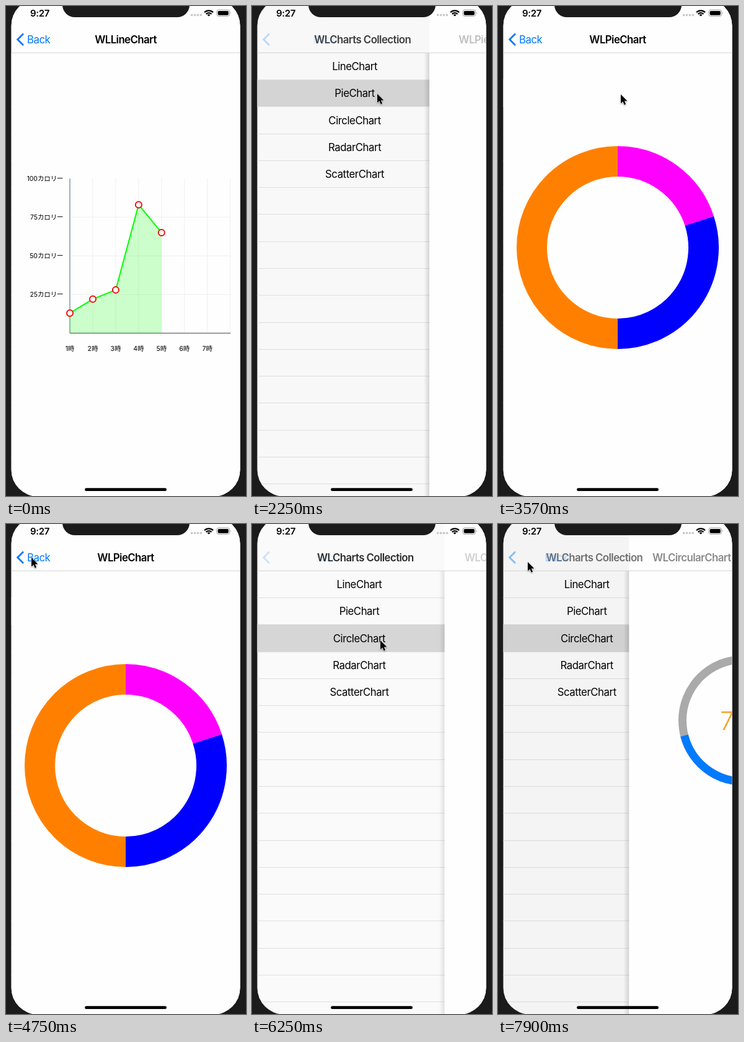
Write an HTML page that moves like this. It is 387 px wide and 787 px high and loops after 8000 ms.

```html
<!DOCTYPE html>
<html lang="en">
<head>
<meta charset="utf-8">
<title>WLCharts Collection</title>
<style>
  html, body { margin: 0; width: 100%; height: 100%; overflow: hidden; background: #1b1b1c; }
  svg { display: block; width: 387px; height: 787px; }
  text { font: 400 16.8px Inter, "Noto Sans CJK JP", "Noto Sans CJK", sans-serif; letter-spacing: -.46px; }
  .title { font-weight: 600; letter-spacing: -.56px; text-anchor: middle; }
  .mid { text-anchor: middle; }
  .time { font-size: 15px; font-weight: 600; letter-spacing: -.3px; }
  .label text { font-size: 10.5px; letter-spacing: -.1px; }
  .percent { font-size: 41px; font-weight: 300; letter-spacing: -.5px; fill: #f5a52f; text-anchor: middle; }
  .sep { stroke: #e3e3e3; }
  .grid { stroke: #efefef; }
  .ring { fill: none; stroke-width: 49; }
</style>
</head>
<body>
<svg viewBox="0 0 387 787">
  <defs>
    <clipPath id="screen"><rect x="8.5" y="-11.3" width="369" height="799" rx="43"/></clipPath>
    <linearGradient id="edge">
      <stop offset="0" stop-color="#000" stop-opacity="0"/>
      <stop offset="1" stop-color="#000" stop-opacity=".14"/>
    </linearGradient>
    <filter id="soft" x="-50%" y="-50%" width="220%" height="220%">
      <feDropShadow dx="0" dy="1" stdDeviation="1" flood-opacity=".4"/>
    </filter>
  </defs>
  <rect width="387" height="787" fill="#1b1b1c"/>
  <g clip-path="url(#screen)">
    <rect width="387" height="787" fill="#fefefe"/>
    <g id="list">
      <rect id="picked" x="8.5" y="75.5" width="369" height="43.2" fill="#d9d9d9"/>
      <g id="rows"></g>
    </g>
    <rect id="dim" x="8.5" width="369" height="787"/>
    <g id="detail">
      <rect id="shade" x="-.5" y="75" width="9" height="712" fill="url(#edge)"/>
      <rect x="8.5" width="370" height="787" fill="#fefefe"/>
      <g id="line" class="label"></g>
      <g id="pie"></g>
      <g id="circle" fill="none" stroke-width="13">
        <circle cx="192.5" cy="315.5" r="98" stroke="#aaa"/>
        <path id="arc" stroke="#007aff"/>
        <text id="percent" class="percent" x="193" y="331"></text>
      </g>
    </g>
    <path d="M8 75.2H378" stroke="#d3d3d3"/>
    <text id="home" class="title" y="59.5">WLCharts Collection</text>
    <text id="title" class="title" y="59.5"></text>
    <g id="back" fill="#007aff">
      <path d="M28 44.5 18.7 53.8 28 63.1" fill="none" stroke="#007aff" stroke-width="2.8"/>
      <text id="backText" x="34" y="59.5">Back</text>
    </g>
    <text class="time" x="39" y="16.5">9:27</text>
    <g id="dots" fill="#c6c6c8"></g>
    <g fill="none" stroke="#000" stroke-width="2.3">
      <path d="M320 10.2a10 10 0 0 1 14 0M322.6 13a6.2 6.2 0 0 1 8.8 0"/>
      <path d="M327 16.6 324.6 14.4a3.6 3.6 0 0 1 4.8 0z" fill="#000" stroke="none"/>
    </g>
    <rect x="339.9" y="6.2" width="20.6" height="10.2" rx="3" fill="none" stroke="#9b9b9b"/>
    <rect x="341.6" y="7.9" width="17.2" height="6.8" rx="1.6"/>
    <path d="M361.8 9.6q1.8 1.7 0 3.4z" fill="#9b9b9b"/>
    <rect x="127" y="774.2" width="132" height="4.9" rx="2.45"/>
  </g>
  <path d="M91 -2A20 20 0 0 0 111 18H276A20 20 0 0 0 296 -2z" fill="#1b1b1c"/>
  <path id="cursor" d="M0 0V14.6L3.4 11.5 5.7 16.8 8.1 15.8 5.9 10.6H10.5z" stroke="#fff" stroke-width="1" paint-order="stroke" filter="url(#soft)"/>
</svg>
<script>
const LOOP = 8000, STEP = 148.4, WIDTH = 369, ROW = 43.28, MID = 193;
const $ = id => document.getElementById(id);
const clamp = v => Math.max(0, Math.min(1, v));

function add(parent, tag, attrs, text) {
  const el = document.createElementNS('http://www.w3.org/2000/svg', tag);
  for (const k in attrs) el.setAttribute(k, attrs[k]);
  if (text) el.textContent = text;
  return parent.appendChild(el);
}
const set = (id, attrs) => { for (const k in attrs) $(id).setAttribute(k, attrs[k]); };

// Clockwise arc; from and to are turns counted from twelve o'clock
function arcPath(cx, cy, r, from, to) {
  if (to <= from) return '';
  const at = turn => {
    const a = turn * 2 * Math.PI;
    return `${cx + r * Math.sin(a)} ${cy - r * Math.cos(a)}`;
  };
  return `M${at(from)}A${r} ${r} 0 ${to - from > .5 ? 1 : 0} 1 ${at(to)}`;
}

// List
['LineChart', 'PieChart', 'CircleChart', 'RadarChart', 'ScatterChart'].forEach((name, i) =>
  add($('rows'), 'text', { class: 'mid', x: MID, y: 103 + i * ROW }, name));
for (let i = 1; i <= 16; i++)
  add($('rows'), 'path', { class: 'sep', d: `M23.5 ${Math.floor(75.3 + i * ROW) + .5}H378` });
for (let i = 0; i < 4; i++) add($('dots'), 'circle', { cx: 299.6 + i * 4.9, cy: 14.6, r: 1.8 });

// Line chart
const chart = $('line'), px = i => 103 + i * 36.95, py = v => 525.5 - v * 2.486;
for (let i = 1; i <= 7; i++) {
  add(chart, 'path', { class: 'grid', d: `M${px(i)} 277V525` });
  add(chart, 'text', { class: 'mid', x: px(i - 1), y: 553.5 }, i + '時');
}
for (const v of [25, 50, 75, 100]) {
  if (v < 100) add(chart, 'path', { class: 'grid', d: `M103 ${py(v)}H362` });
  add(chart, 'text', { 'text-anchor': 'end', x: 92.5, y: py(v) + 3.6 }, v + 'カロリー');
}
const values = [13, 22, 28, 83, 65];
const points = values.map((v, i) => `${px(i)} ${py(v)}`).join('L');
add(chart, 'path', { d: 'M103 277V525.5', stroke: '#6f8792', 'stroke-width': 1.3 });
add(chart, 'path', { d: 'M103 525.5H362', stroke: '#777', 'stroke-width': 1.3 });
add(chart, 'path', { d: `M${points}V525.5H103z`, fill: '#0f0', 'fill-opacity': .2 });
add(chart, 'path', { d: 'M' + points, fill: 'none', stroke: '#0f0', 'stroke-width': 2 });
values.forEach((v, i) =>
  add(chart, 'circle', { cx: px(i), cy: py(v), r: 5, fill: '#fff', stroke: '#e8120c', 'stroke-width': 2 }));

// Pie chart
const slices = [[0, .2, '#f0f'], [.2, .5, '#00f'], [.5, 1, '#ff8000']].map(([from, to, stroke]) =>
  ({ from, to, el: add($('pie'), 'path', { class: 'ring', stroke }) }));

const PAGES = {
  line: { row: 0, title: 'WLLineChart' },
  pie: { row: 1, title: 'WLPieChart', span: 6.3 },
  circle: { row: 2, title: 'WLCircularChart', span: 5.3 }
};
const MOVES = [
  { at: -3.12, page: 'line' },
  { at: 6.505, page: 'pie', push: true },
  { at: 23.56, page: 'pie' },
  { at: 33.6, page: 'circle', push: true },
  { at: 44.045, page: 'circle' }
];
const PATHS = [
  [[-6, 96, 130], [-5, 62, 84], [-4, 46, 61], [-1, 46, 61]],
  [[3, 216, 141], [4, 202, 141], [15, 202, 141], [16, 198, 142], [17, 198, 142], [21, 50, 57], [22, 41, 54], [28, 41, 54]],
  [[30, 150, 190], [31, 207, 187], [37, 207, 187]],
  [[40, 112, 148], [41, 74, 100], [42, 48, 61], [46, 48, 61]]
];

function stepAt(t) {
  if (t < 1220) return Math.min(-1, Math.max(-7, Math.floor((t - 296) / STEP) - 6));
  return Math.floor((t - 1190) / STEP);
}

function drawCursor(n) {
  const path = PATHS.find(p => n >= p[0][0] && n <= p[p.length - 1][0]);
  $('cursor').style.display = path ? '' : 'none';
  if (!path) return;
  const i = Math.max(1, path.findIndex(k => k[0] >= n));
  const [a, b] = [path[i - 1], path[i]], f = (n - a[0]) / (b[0] - a[0]);
  set('cursor', { transform: `translate(${a[1] + (b[1] - a[1]) * f} ${a[2] + (b[2] - a[2]) * f})` });
}

function drawCharts(grow) {
  const q = grow * grow * (3 - 2 * grow);
  for (const { from, to, el } of slices)
    el.setAttribute('d', arcPath(193, 388, 138.5, from, Math.min(q, to)));
  set('arc', { d: arcPath(192.5, 315.5, 98, 0, .71 * q) });
  $('percent').textContent = Math.round(71 * q) + '%';
}

function render(t) {
  const n = stepAt(t);
  const move = MOVES.filter(m => m.at <= n).pop() || MOVES[0];
  const next = MOVES.find(m => m.at > n);
  const page = PAGES[move.page];
  const x = Math.max(0, 1.93 * (n - move.at));
  const p = x > 7.6 ? 1 : 1 - (1 + x) * Math.exp(-x);   // damped spring
  const cover = move.push ? p : 1 - p;
  const rest = 1 - cover;

  set('list', { transform: `translate(${-.3 * WIDTH * cover})` });
  set('dim', { opacity: .09 * cover, width: WIDTH * rest });
  set('detail', { transform: `translate(${WIDTH * rest})`, visibility: cover ? 'visible' : 'hidden' });
  set('shade', { opacity: Math.min(1, 4 * cover) });
  for (const id in PAGES) $(id).style.display = id === move.page ? '' : 'none';
  drawCharts(move.push ? clamp((n - move.at) / page.span) : 1);

  const tapped = next && next.push && next.at - n < .7;
  const row = tapped ? PAGES[next.page].row : page.row;
  set('picked', {
    y: 75.4 + row * ROW,
    opacity: tapped || move.push ? 1 : clamp((6.6 - x) / 4)
  });

  const slide = 79 * Math.pow(cover, move.push ? 1.2 : .93);
  const enter = WIDTH * (move.push ? .795 * Math.pow(rest, 1.6) : .624 * Math.pow(rest, 1.1));
  set('home', { x: MID - slide, opacity: rest });
  set('title', { x: MID + enter, opacity: cover });
  $('title').textContent = page.title;
  set('back', { opacity: cover });
  set('backText', { x: 113 - slide, opacity: Math.sqrt(cover) });
  drawCursor(n);
}

const start = performance.now();
(function tick() {
  render((performance.now() - start) % LOOP);
  requestAnimationFrame(tick);
})();
</script>
</body>
</html>
```
